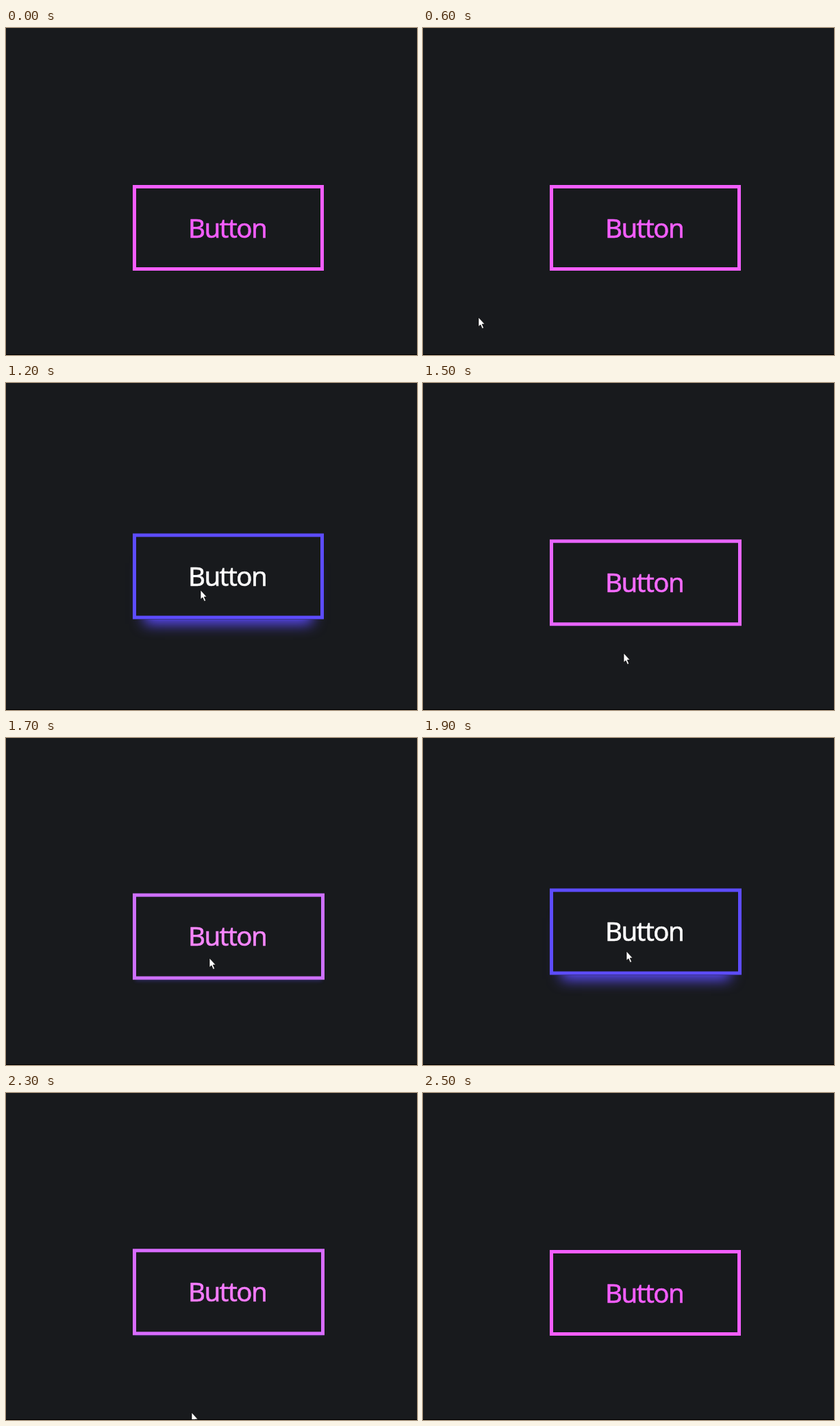
An HTML page that plays this animation: 600 px wide and 477 px high, repeating every 3.5 s.

```html
<!DOCTYPE html>
<html lang="en">
<head>
<meta charset="utf-8">
<title>Raising button</title>
<style>
  html, body { margin: 0; width: 100%; height: 100%; overflow: hidden; background: #181a1d; }
  #stage { position: absolute; left: 0; top: 0; width: 600px; height: 477px; overflow: hidden; }
  #stage::after { content: ""; position: absolute; left: 0; bottom: 0; width: 100%; height: 1px; background: #000; }
  #button { position: absolute; left: 185px; top: 229px; box-sizing: border-box; border: 5px solid; }
  #button svg { position: absolute; left: -5px; top: -5px; overflow: visible; }
  #label { font: 38.5px "Noto Sans", "Open Sans", sans-serif; letter-spacing: -1.6px; stroke-width: .5px; }
  #cursor { position: absolute; left: 0; top: 0; overflow: visible; }
</style>
</head>
<body>
<div id="stage">
  <div id="button">
    <svg width="279" height="125"><text id="label" x="81" y="76.5">Button</text></svg>
  </div>
  <svg id="cursor" width="12" height="18">
    <path d="M0 0V13.6L3 10.9L5.4 16.4L7.7 15.4L5.3 10H9.2Z" fill="#fff" stroke="#000" stroke-width=".7"/>
  </svg>
</div>
<script>
  const LOOP = 3500, FRAME = 100, FADE = 250, EM = 38;
  const PINK = [244, 94, 255], BLUE = [93, 76, 255], WHITE = [255, 255, 255];

  const HOVERS = [{ enter: 825, leave: 1335 }, { enter: 1655, leave: 2170 }];

  const ENTRY = { x: 81, y: 422 }, SHOWN = 600, HIDDEN = 2400;
  const slowDown = t => 1 - (1 - t) ** 3;
  const speedUp = t => t ** 1.5;
  const MOVES = [
    { start: 600, end: 1100, x: 284, y: 302, curve: slowDown },
    { start: 1300, end: 1500, x: 293, y: 394, curve: slowDown },
    { start: 1500, end: 1900, x: 297, y: 311, curve: slowDown },
    { start: 1900, end: 2300, x: 271, y: 466, curve: speedUp }
  ];

  const [button, label, cursor] = ["button", "label", "cursor"].map(id => document.getElementById(id));
  const progress = (time, start, end) => Math.min(1, Math.max(0, (time - start) / (end - start)));
  const mix = (a, b, p) => a.map((v, i) => v + (b[i] - v) * p);
  const rgb = c => `rgb(${c.map(Math.round).join(",")})`;

  // CSS "ease": cubic-bezier(.25, .1, .25, 1), solved by bisection
  function ease(x) {
    const bezier = (s, a, b) => 3 * s * (1 - s) ** 2 * a + 3 * s * s * (1 - s) * b + s ** 3;
    if (x <= 0 || x >= 1) return x;
    let low = 0, high = 1;
    for (let i = 0; i < 20; i++) {
      const mid = (low + high) / 2;
      if (bezier(mid, .25, .25) < x) low = mid; else high = mid;
    }
    return bezier(low, .1, 1);
  }

  const fade = (time, start) => ease(progress(time, start, start + FADE));
  const hoverAt = time => HOVERS.reduce((p, h) => p + fade(time, h.enter) - fade(time, h.leave), 0);

  function pointerAt(time) {
    return MOVES.reduce((from, move) => {
      const p = move.curve(progress(time, move.start, move.end));
      return { x: from.x + (move.x - from.x) * p, y: from.y + (move.y - from.y) * p };
    }, ENTRY);
  }

  function draw(time) {
    const p = hoverAt(time);
    const grow = p > 0 && p < 1 ? 1 : 0; // pixel rounding while it moves
    const edge = mix(PINK, BLUE, p);
    edge[1] += 120 * p * (1 - p); // the blend is paler halfway
    button.style.width = `${279 + grow}px`;
    button.style.height = `${125 + grow}px`;
    button.style.transform = `translateY(${-EM / 4 * p}px)`;
    button.style.borderColor = rgb(edge);
    button.style.boxShadow =
      `0 ${EM * .65 * p}px ${EM * .5 * p}px ${-EM * .45 * p}px rgba(${BLUE},${p})`;
    label.style.fill = label.style.stroke = rgb(mix(PINK, WHITE, p));

    const { x, y } = pointerAt(time);
    cursor.style.display = time >= SHOWN && time < HIDDEN ? "block" : "none";
    cursor.style.transform = `translate(${Math.round(x)}px, ${Math.round(y)}px)`;
  }

  const start = performance.now();
  function tick() {
    const time = (performance.now() - start) % LOOP;
    draw(Math.floor(time / FRAME) * FRAME);
    requestAnimationFrame(tick);
  }
  tick();
</script>
</body>
</html>
```
